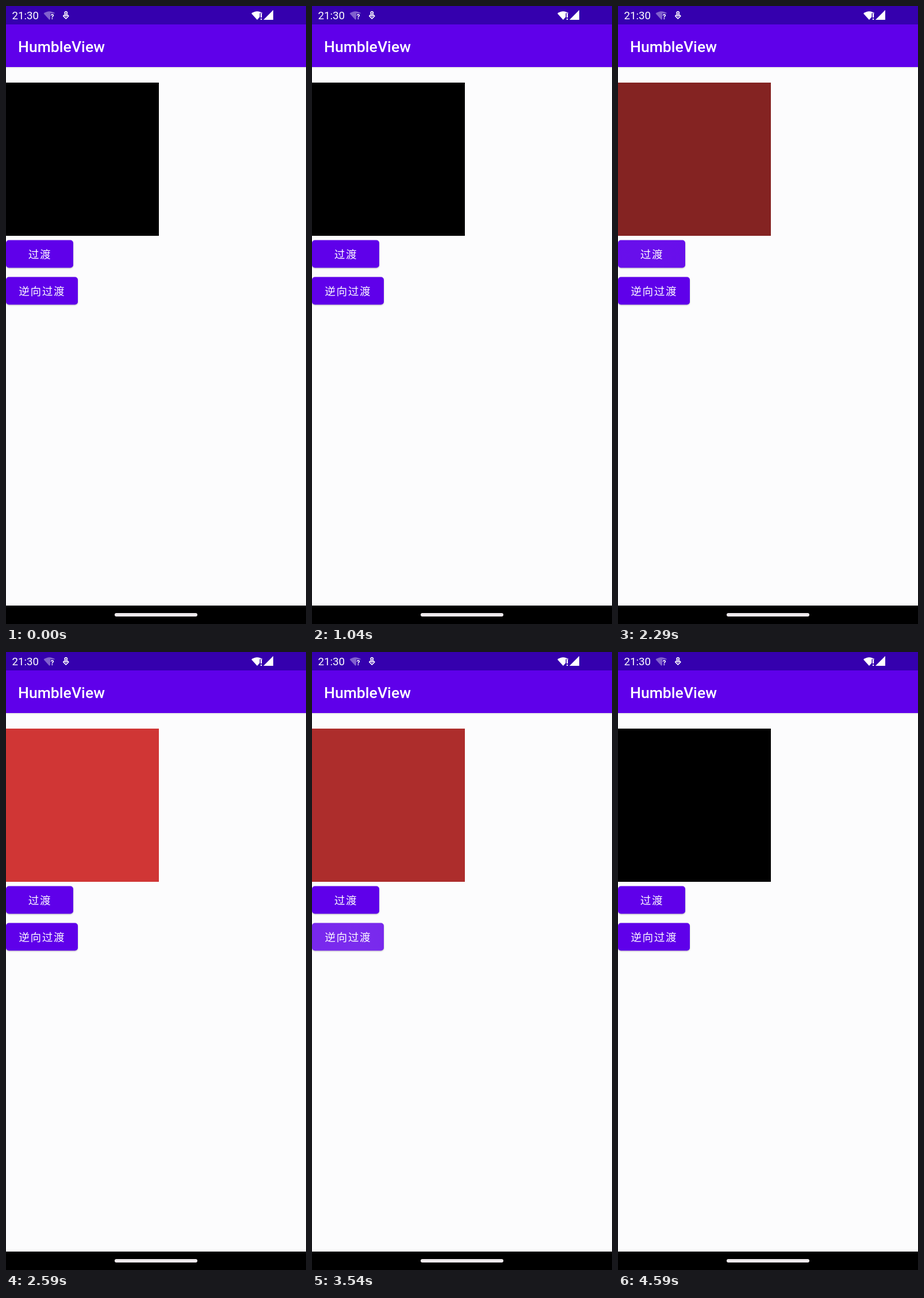
Write an HTML page that moves like this. It is 522 px wide and 1073 px high and loops after 4750 ms.

```html
<!DOCTYPE html>
<html lang="zh-CN">
<head>
<meta charset="utf-8">
<title>Colour transition</title>
<style>
  html, body { margin: 0; width: 100%; height: 100%; overflow: hidden; background: #fcfcfd; }
  svg { display: block; width: 522px; height: 1073px; }
  text { fill: #fff; font-family: Roboto, sans-serif; }
  .label { font: 18.6px "Noto Sans CJK SC", "Noto Sans CJK", sans-serif; letter-spacing: 1.66px; }
</style>
</head>
<body>
<svg viewBox="0 0 522 1073" xmlns="http://www.w3.org/2000/svg">
  <defs>
    <radialGradient id="rippleFill">
      <stop offset="0" stop-color="#fff"/>
      <stop offset=".6" stop-color="#fff" stop-opacity=".9"/>
      <stop offset="1" stop-color="#fff" stop-opacity="0"/>
    </radialGradient>
    <radialGradient id="touchFill">
      <stop offset="0" stop-color="#fff" stop-opacity=".56"/>
      <stop offset=".84" stop-color="#fff" stop-opacity=".66"/>
      <stop offset=".92" stop-color="#fff" stop-opacity=".4"/>
      <stop offset="1" stop-color="#fff" stop-opacity="0"/>
    </radialGradient>
    <linearGradient id="barShadow" x2="0" y2="1">
      <stop offset="0" stop-opacity=".1"/>
      <stop offset="1" stop-opacity="0"/>
    </linearGradient>
    <path id="fan" d="M-10 -11 Q0 -18.5 10 -11 L0 0Z"/>
  </defs>

  <rect width="522" height="1073" fill="#fcfcfd"/>
  <rect y="106" width="522" height="3" fill="url(#barShadow)"/>
  <rect y="32" width="522" height="74" fill="#5f00ea"/>
  <rect width="522" height="32" fill="#3500ae"/>
  <text x="10.5" y="23" font-size="18.7">21:30</text>
  <text x="21" y="80" font-size="26.6" font-weight="500">HumbleView</text>

  <g fill="#fff">
    <use href="#fan" x="75.5" y="24" opacity=".38"/>
    <rect x="77" y="13" width="9" height="11" fill="#3500ae"/>
    <text x="77.5" y="22.5" font-size="12" font-weight="700">?</text>
    <g fill="none" stroke="#fff" stroke-width="1.7" stroke-linejoin="round">
      <circle cx="104.3" cy="12" r="2.1"/>
      <path d="M104.3 22 L99.8 17.4 L101.8 15.4 L104.3 17.7 L106.8 15.4 L108.8 17.4Z"/>
    </g>
    <use href="#fan" x="437" y="24"/>
    <rect x="441.5" y="12.5" width="6" height="12" fill="#3500ae"/>
    <path d="M443 13h2.2v7h-2.2zM443 21.8h2.2v2.2h-2.2zM448 24L465 7V24Z"/>
  </g>

  <rect id="box" y="133" width="266" height="266"/>
  <g id="buttons"></g>

  <rect y="1041" width="522" height="32"/>
  <rect x="189" y="1054" width="144" height="6" rx="3" fill="#eee9ec"/>
</svg>
<script>
const LOOP = 4750, FADE = 1000;
const RED = [253, 66, 65];
const buttons = [
  { label: "过渡", y: 406.5, width: 117, textX: 38.7, click: 1768, touch: [72, 436] },
  { label: "逆向过渡", y: 470.5, width: 125, textX: 22.3, click: 3225, touch: [76, 501] }
];

const clamp = v => Math.max(0, Math.min(1, v));
const ramp = (t, start, length) => clamp((t - start) / length);
const easeOut = v => 1 - (1 - v) ** 3;

document.getElementById("buttons").innerHTML = buttons.map((b, i) => `
  <clipPath id="clip${i}"><rect y="${b.y}" width="${b.width}" height="48" rx="5"/></clipPath>
  <rect id="face${i}" y="${b.y}" width="${b.width}" height="48" rx="5" fill="#5f00ea"/>
  <g clip-path="url(#clip${i})">
    <circle id="ripple${i}" cx="${b.touch[0]}" cy="${b.touch[1]}" fill="url(#rippleFill)"/>
  </g>
  <text class="label" x="${b.textX}" y="${b.y + 31.3}">${b.label}</text>
  <circle id="touch${i}" cx="${b.touch[0]}" cy="${b.touch[1]}" r="15.5" fill="url(#touchFill)"/>`).join("");

const box = document.getElementById("box");
buttons.forEach((b, i) => {
  for (const part of ["face", "ripple", "touch"]) b[part] = document.getElementById(part + i);
});

function drawButton(b, t) {
  const down = b.click - 160;
  const lift = ramp(t, down, 100) - ramp(t, b.click + 20, 100);
  b.face.style.filter =
    `drop-shadow(0 ${1.5 + 2.5 * lift}px ${1.3 + 2.7 * lift}px rgba(0,0,0,${0.25 + 0.07 * lift}))`;

  const glow = ramp(t, b.click - 70, 130) - ramp(t, b.click + 190, 450);
  b.ripple.setAttribute("opacity", 0.24 * glow);
  b.ripple.setAttribute("r", 20 + 110 * easeOut(ramp(t, b.click - 70, 250)));

  b.touch.setAttribute("visibility", t >= down && t < b.click - 10 ? "visible" : "hidden");
}

function draw(t) {
  const [forward, reverse] = buttons;
  const mix = ramp(t, forward.click, FADE) - ramp(t, reverse.click, FADE);
  box.setAttribute("fill", `rgb(${RED.map(c => Math.round(c * mix))})`);
  buttons.forEach(b => drawButton(b, t));
}

const begin = performance.now();
function tick() {
  draw((performance.now() - begin) % LOOP);
  requestAnimationFrame(tick);
}
tick();
</script>
</body>
</html>
```
